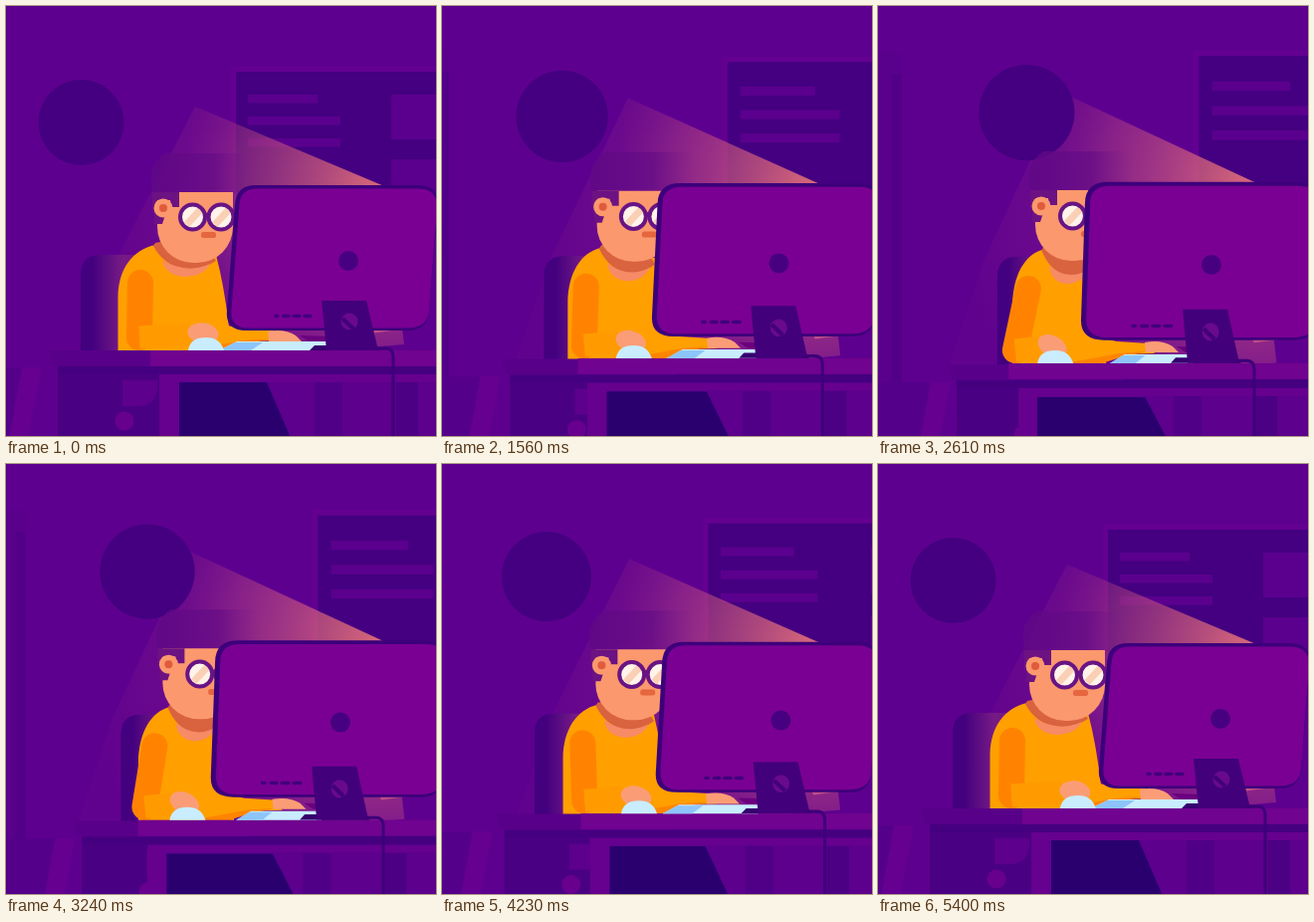
These frames come from a looping animation (432x432 px, 5430 ms). An HTML page:

```html
<!DOCTYPE html>
<html lang="en">
<head>
<meta charset="utf-8">
<title>Night desk</title>
<style>
  html, body { margin: 0; width: 100%; height: 100%; overflow: hidden; background: #5e008f; }
  svg { display: block; width: 100vw; height: 100vh; }
</style>
</head>
<body>
<svg viewBox="0 0 432 432">
  <defs>
    <radialGradient id="glow" gradientUnits="userSpaceOnUse" cx="378" cy="188" r="290">
      <stop offset="0" stop-color="#ee7878" stop-opacity=".9"/>
      <stop offset=".25" stop-color="#d2607c" stop-opacity=".7"/>
      <stop offset=".5" stop-color="#bd4b80" stop-opacity=".45"/>
      <stop offset=".7" stop-color="#a83a80" stop-opacity=".17"/>
      <stop offset="1" stop-color="#a83a80" stop-opacity=".04"/>
    </radialGradient>
    <linearGradient id="hairFade">
      <stop offset="0" stop-color="#5f0886" stop-opacity=".8"/>
      <stop offset=".6" stop-color="#650c86" stop-opacity=".7"/>
      <stop offset="1" stop-color="#7a1c86" stop-opacity="0"/>
    </linearGradient>
    <linearGradient id="chairFade">
      <stop offset=".15" stop-color="#43007f"/>
      <stop offset=".55" stop-color="#761a85"/>
    </linearGradient>
  </defs>
  <rect width="432" height="432" fill="#5e008f"/>

  <g id="shelf">
    <rect x="-60" y="40" width="40" height="332" fill="#59008c"/>
    <rect x="-30" y="62" width="10" height="310" fill="#510087"/>
  </g>

  <g id="board">
    <rect x="226" y="61" width="230" height="135" fill="#640091"/>
    <rect x="231" y="66" width="225" height="128" fill="#440080"/>
    <g fill="#5b008e">
      <rect x="243" y="89" width="70" height="8.5"/>
      <rect x="243" y="111" width="93" height="8.5"/>
      <rect x="243" y="133" width="93" height="8.5"/>
      <rect x="387" y="89" width="70" height="45"/>
      <rect x="387" y="154" width="70" height="42"/>
    </g>
  </g>

  <path id="cone" d="M190 101L380 181L400 340L330 346H78L113 250Z" fill="url(#glow)"/>
  <g id="clock"><circle cx="75.5" cy="117" r="43" fill="#440080"/></g>
  <path id="chair" d="M75 362V270Q75 250 95 250H150V362Z" fill="url(#chairFade)"/>

  <g id="body">
    <path d="M112.5 352V292C113 264 127 245 150 240L211 250Q219 280 224 322L228 352Z" fill="#ff9f00"/>
    <path d="M148 241Q158 260 180 265Q200 264 211 256L204 246Q180 230 150 238Z" fill="#d9623f"/>
    <path d="M157 255Q160 271 180 272Q199 271 205 259Q181 270 157 255Z" fill="#f68b66"/>
  </g>

  <g id="head">
    <path d="M147 188Q141 160 160 148H250V188Z" fill="url(#hairFade)"/>
    <path d="M152 187H228V222A36 36 0 0 1 192 258H188A36 36 0 0 1 152 222Z" fill="#fb986d"/>
    <path d="M147 187H174V202H165V195H152V205H147Z" fill="#6c1282"/>
    <path d="M149 207V219H157L160 210Z" fill="#6c1282"/>
    <circle cx="158" cy="203" r="9.5" fill="#fb986d"/>
    <circle cx="158" cy="203" r="4" fill="#e05b3c"/>
  </g>
  <g id="glasses">
    <g id="lens">
      <circle cx="187.5" cy="212" r="12.5" fill="#fff3ea"/>
      <path d="M179 217L193 202L199 206L184 222Z" fill="#f9d0b6"/>
      <circle cx="187.5" cy="212" r="12.5" fill="none" stroke="#681484" stroke-width="4"/>
    </g>
    <use href="#lens" x="28.5"/>
    <path d="M200 211Q202 208 204 211" fill="none" stroke="#681484" stroke-width="4"/>
    <rect x="196" y="227" width="15" height="6" rx="2.5" fill="#e5663f"/>
  </g>

  <g id="sleeve">
    <path d="M196 315L236 324L268 326L274 336L240 337L200 350Z" fill="#ff9f00"/>
    <path d="M184 346L238 336L266 334L240 340L214 348Z" fill="#ff8500"/>
  </g>
  <path id="upperArm" fill="none" stroke="#ff8300" stroke-width="26" stroke-linecap="round"/>
  <path id="foreArm" fill="none" stroke="#ff9b00" stroke-width="23"/>

  <g id="books">
    <path d="M-60 363H16L2 440H-60Z" fill="#54008a"/>
    <path d="M16 363H36L21 440H2Z" fill="#660090"/>
  </g>
  <g id="drawer">
    <rect x="52" y="362" width="110" height="80" fill="#4a0082"/>
    <path d="M117 376H152V384Q150 402 132 402H117Z" fill="#5d008d"/>
    <circle cx="119" cy="417" r="9.5" fill="#68008f"/>
  </g>
  <g id="frame">
    <rect x="154" y="360" width="320" height="80" fill="#5c008d"/>
    <rect x="310" y="378" width="28" height="60" fill="#500087"/>
    <rect x="392" y="378" width="22" height="60" fill="#4c0084"/>
    <path d="M154 370H470V378H174V440H154Z" fill="#66008f"/>
  </g>
  <path id="seat" d="M174 378H262L286 434H174Z" fill="#2a006f"/>
  <g id="deskEdge">
    <rect x="52" y="360" width="420" height="10" fill="#450080"/>
    <path d="M43 346H220V362H48Z" fill="#580089"/>
  </g>
  <rect id="deskTop" x="145" y="346" width="330" height="16" fill="#70038f"/>

  <g id="keys">
    <path d="M214 346L232 337H327L318 346Z" fill="#c9edff"/>
    <path d="M214 346L230 338H258L246 346Z" fill="#8dc5fb"/>
  </g>
  <g id="typingHand">
    <path d="M263 327Q280 324 291 331L297 337H264Z" fill="#fa9d76"/>
    <path d="M295 331L326 332V337H304Z" fill="#6b007e"/>
  </g>
  <ellipse id="hand" rx="15.5" ry="10.5" fill="#fa9d76"/>
  <path id="mouse" d="M-18 6Q-16 -7 0 -7Q14 -7 18 6Z" fill="#c9edff"/>

  <g id="monitor">
    <path d="M368 324H402L370 328.5Z" fill="#c04e86"/>
    <path d="M230 200Q231 180 251 180H415Q436 181 434 201L425 306Q424 326 404 326H241Q220 326 222 306Z" fill="#3d007b"/>
    <path d="M234.5 200Q235 183.5 253 183.5H415Q434 184 433 203L425 305Q424 323.5 404 323.5H243Q225 323.5 226.5 305Z" fill="#7a0093"/>
  </g>
  <circle id="badge" cx="344" cy="256" r="10" fill="#47007f"/>
  <path id="vents" d="M271 311.5h2m6 0h5m5 0h6m5 0h6" stroke="#42007d" stroke-width="3.5" stroke-linecap="round"/>
  <g id="stand">
    <path d="M305 346L310 341H370L376 346Z" fill="#36006f"/>
    <path d="M317 296H362L374 346H322Z" fill="#42007b"/>
    <circle cx="345" cy="317" r="8.5" fill="#680a8b"/>
    <path d="M338 314L349 324" stroke="#42007b" stroke-width="4"/>
    <path d="M370 344H382Q389 344 389 353V440" fill="none" stroke="#3d0079" stroke-width="3"/>
  </g>
</svg>

<script>
const LOOP = 5430;
const $ = id => document.getElementById(id);
const mix = (a, b, k) => a + (b - a) * k;
const mixPoint = (a, b, k) => [mix(a[0], b[0], k), mix(a[1], b[1], k)];
const smooth = v => { v = Math.min(1, Math.max(0, v)); return v * v * (3 - 2 * v); };
const pulse = (t, start, end, ramp) => smooth((t - start) / ramp) * smooth((end - t) / ramp);

// Camera travel: 0 far, 1 near
const travel = t => smooth(t < 2710 ? (t - 20) / 2690 : (5385 - t) / 2675);

// What the full camera travel does to each layer: shift, scale and slant
const layers = {
  shelf: { x: 44, y: 7 },
  board: { x: 64, y: -24, w: 1.12, h: 1.12 },
  clock: { x: 65, y: -24, w: 1.12, h: 1.12 },
  cone: { x: -10, y: -28, w: 1.026, h: 1.137 },
  chair: { x: 45, y: 2 },
  body: { x: 43, y: -16, w: .82, h: 1.085 },
  head: { x: 6, y: -2 },
  glasses: { x: 8, y: -1 },
  sleeve: { x: 4, y: 13 },
  books: { x: 37, y: 15 },
  drawer: { x: 27, y: 14 },
  frame: { x: -13, y: 14 },
  seat: { x: -54, y: 15, w: 1.23 },
  deskEdge: { x: 27, y: 14 },
  deskTop: { x: -14, y: 13 },
  keys: { x: 62, y: 13, w: .8 },
  typingHand: { x: 5, y: 11 },
  monitor: { x: -71, y: -19, w: 1.167, h: 1.088, slant: .052 },
  badge: { x: -9, y: 4 },
  vents: { x: -42, y: 10, w: 1.1 },
  stand: { x: -11, y: -15, h: 1.08 }
};

function place(id, [x, y], extra = "") {
  $(id).setAttribute("transform", `translate(${x} ${y}) ${extra}`);
}

function drawLayers(p) {
  for (const id in layers) {
    const { x, y, w = 1, h = 1, slant = 0 } = layers[id];
    $(id).setAttribute("transform", `matrix(${mix(1, w, p)} 0 ${slant * p} ${mix(1, h, p)} ${x * p} ${y * p})`);
  }
}

function drawArm(t, p) {
  const deskY = mix(346, 359, p);
  const slide = 43 * p ** 1.5 + 11 * pulse(t, 4200, LOOP, 500);
  const mouse = [201 + 20 * p - slide, deskY - 6];
  const lift = pulse(t, 420, 1320, 300);

  // The hand rests on the mouse, or rises to the chin
  const shoulder = [mix(135, 151, p) + 5 * lift, mix(278, 284, p) - 3 * lift];
  const restElbow = [134 + 23 * p - Math.max(0, slide - 12) * .62, deskY - 13];
  const elbow = mixPoint(restElbow, [181, 318], lift);
  const hand = mixPoint([mouse[0] - 3, mouse[1] - 11], [184, 259], lift);
  const reach = Math.hypot(hand[0] - elbow[0], hand[1] - elbow[1]);
  const wrist = mixPoint(hand, elbow, Math.min(.8, 12 / reach));

  $("upperArm").setAttribute("d", `M${shoulder}L${elbow}`);
  $("foreArm").setAttribute("d", `M${elbow}L${wrist}`);
  place("hand", hand, `rotate(${mix(8 + slide * .5, -88, lift)}) scale(${mix(1, 1.15, lift)})`);
  place("mouse", mouse);
}

function draw(t) {
  const p = travel(t);
  drawLayers(p);
  drawArm(t, p);
}

function tick() {
  draw(performance.now() % LOOP);
  requestAnimationFrame(tick);
}
tick();
</script>
</body>
</html>
```
